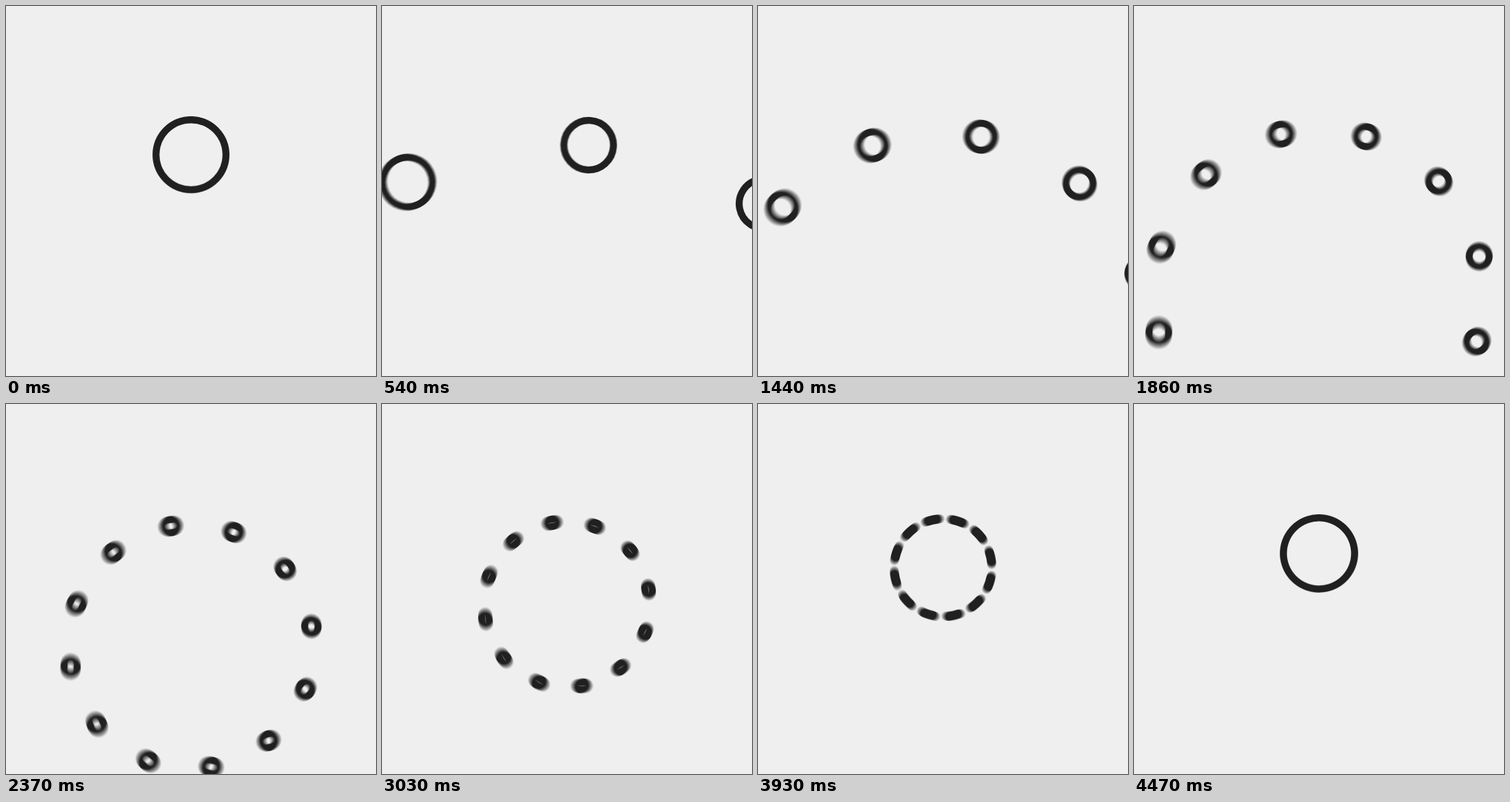
Write an HTML page with a canvas that moves like this. It is 500 px wide and 500 px high and loops after 4500 ms.

```html
<!DOCTYPE html>
<html>
<head>
<meta charset="utf-8">
<style>
  html, body { margin: 0; height: 100%; overflow: hidden; background: #efefef; }
  canvas { display: block; }
</style>
</head>
<body>
<canvas id="stage" width="500" height="500"></canvas>
<script>
const ctx = document.getElementById('stage').getContext('2d');
const LOOP = 4500, STEP = 30, SHUTTER = 0.6, SAMPLES = 16;
const COUNT = 12, RADIUS = 47.3, WEIGHT = 9.4, ZOOM = 14, TOP = 149;
const TURN = 698 * Math.PI / 180;

// Outline of a small circle swept along the big ring by +-half radians.
function bead(path, cx, cy, ring, r, angle, half) {
  const a = angle - half, b = angle + half;
  const at = t => [cx + ring * Math.cos(t), cy + ring * Math.sin(t)];
  path.moveTo(cx + (ring + r) * Math.cos(a), cy + (ring + r) * Math.sin(a));
  path.arc(cx, cy, ring + r, a, b);
  path.arc(...at(b), r, b, b + Math.PI);
  path.arc(cx, cy, ring - r, b, a, true);
  path.arc(...at(a), r, a + Math.PI, a + 2 * Math.PI);
  path.closePath();
}

function drawRing(p) {
  const ring = RADIUS * ZOOM ** (1 - p);
  const r = RADIUS * (ZOOM ** -p - 1 / ZOOM) / (1 - 1 / ZOOM);
  const cy = TOP + WEIGHT / 2 + r + ring;
  const half = Math.PI / COUNT * p ** 6;
  const path = new Path2D();
  for (let i = 0; i < COUNT; i++) {
    const angle = TURN * p ** 2.5 - Math.PI / 2 + i * 2 * Math.PI / COUNT;
    bead(path, 250, cy, ring, r, angle, half);
  }
  ctx.stroke(path);
}

function render(time) {
  const start = Math.floor(time / STEP) * STEP;
  ctx.clearRect(0, 0, 500, 500);
  // Adding faint copies averages them into motion blur.
  ctx.globalCompositeOperation = 'lighter';
  ctx.globalAlpha = 1 / SAMPLES;
  ctx.strokeStyle = '#202020';
  ctx.lineWidth = WEIGHT;
  ctx.lineJoin = 'round';
  for (let i = 0; i < SAMPLES; i++) {
    const t = start + ((i + 0.5) / SAMPLES - 0.5) * SHUTTER * STEP;
    drawRing((t + LOOP) % LOOP / LOOP);
  }
}

let begin;
function tick(now) {
  begin ??= now;
  render((now - begin) % LOOP);
  requestAnimationFrame(tick);
}
requestAnimationFrame(tick);
</script>
</body>
</html>
```
